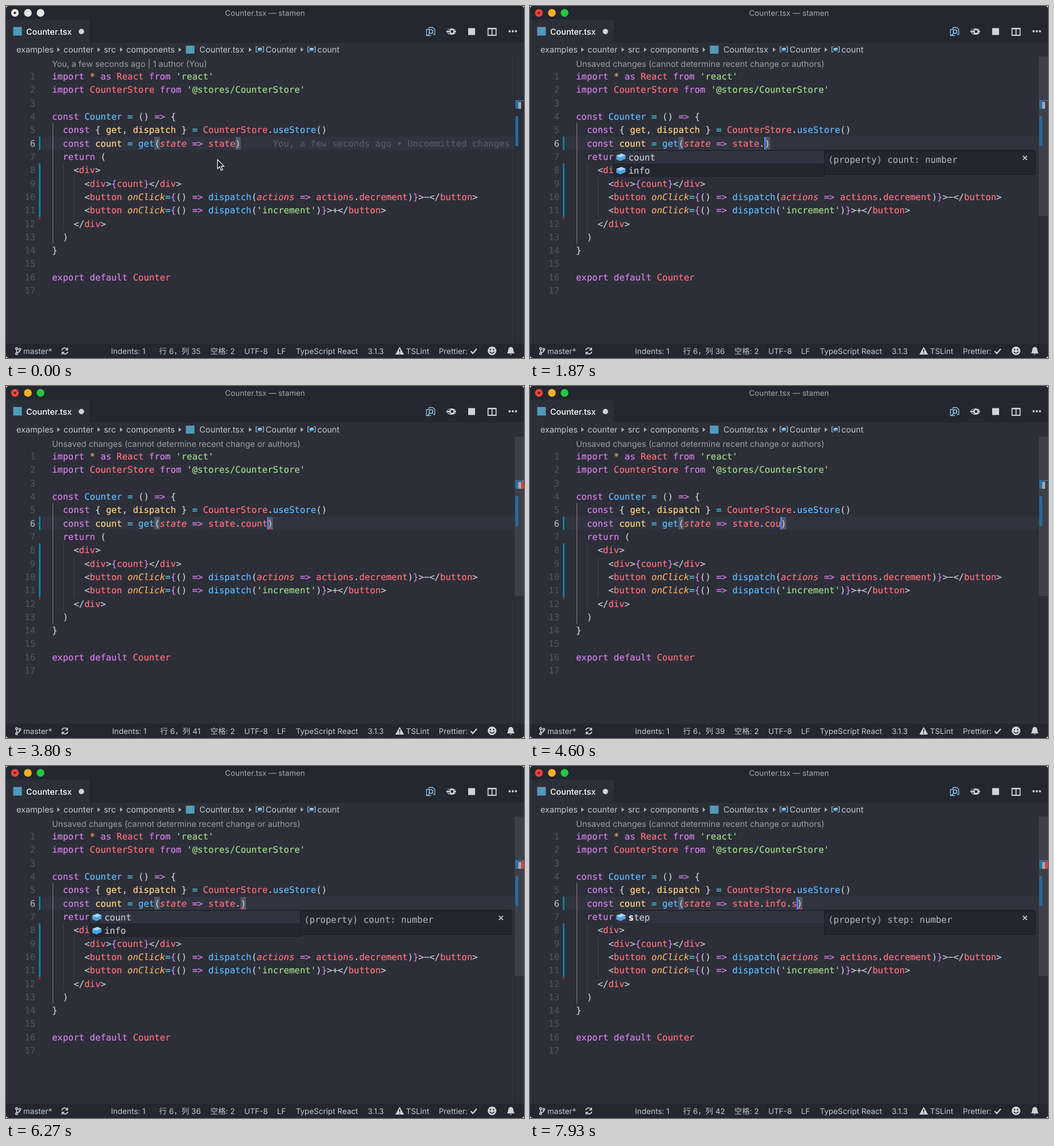
Recreate the animation shown at these times as an HTML page. Size 900 by 613 pixels, loop 8 s.

```html
<!DOCTYPE html>
<html lang="en">
<head>
<meta charset="utf-8">
<title>Counter.tsx</title>
<style>
html, body { margin: 0; width: 100%; height: 100%; overflow: hidden; background: #fff; }
svg { display: block; width: 900px; height: 613px; border-radius: 5px; }
text { white-space: pre; text-rendering: geometricPrecision; color: #c3c8d2; }
text, tspan { fill: currentColor; }
.ui { font-family: Inter, "Noto Sans CJK SC", "Noto Sans CJK", sans-serif; font-size: 14.4px; }
.small { font-size: 13.4px; }
.title { font-size: 13.3px; color: #a6a9b1; }
.tab { font-weight: 500; color: #fff; }
.code { font-family: "DejaVu Sans Mono", monospace; font-size: 15.55px; }
.code, .code text { stroke: currentColor; stroke-width: .22px; }
.code tspan { stroke: currentColor; }
.p { color: #d681e9; }
.r { color: #ff707b; }
.g { color: #9fdc86; }
.b { color: #60bbff; }
.y { color: #ffd580; }
.o { color: #eeac68; }
.c { color: #52c8de; }
.w { color: #c8cdd8; }
.ri { color: #ff707b; font-style: italic; }
.oi { color: #eeac68; font-style: italic; }
.hit { color: #fff; font-weight: bold; }
.num { color: #4f535e; text-anchor: end; }
.now { color: #aaaeb7; }
.dim { color: #575b66; }
.lens { color: #9da0a8; }
.doc { color: #a5a9b3; }
.line { fill: none; stroke: #d0d3d9; stroke-width: 1.6; }
.solid { fill: #d0d3d9; }
</style>
</head>
<body>
<svg viewBox="0 0 900 613">
  <defs>
    <g id="cube">
      <path d="M0 3.5 9 0l7 3v6l-9 4-7-3z" fill="#4aa3e0"/>
      <path d="M0 3.5 9 0l7 3-9 3.5z" fill="#a9d8f7"/>
    </g>
    <g id="field">
      <path d="M3 0H0v9h3M10 0h3v9h-3" fill="none" stroke="#b9bfca" stroke-width="1.2"/>
      <use href="#cube" transform="translate(2.5 1.5) scale(.5)"/>
    </g>
    <path id="chevron" d="M0 0l5 4-5 4z" fill="#a4a8b1"/>
  </defs>

  <rect width="900" height="613" fill="#2c2e38"/>
  <rect width="900" height="64" fill="#24272f"/>
  <rect y="24" width="146" height="40" fill="#2c2e38"/>
  <path d="M146.5 24v40" stroke="#1c1e25"/>
  <rect y="588" width="900" height="25" fill="#24272f"/>

  <g id="lights">
    <circle cx="15.5" cy="12" r="6.7"/>
    <circle cx="38" cy="12" r="6.7"/>
    <circle cx="60" cy="12" r="6.7"/>
    <circle cx="15.5" cy="12" r="2" fill="#51161a"/>
  </g>
  <text class="ui title" x="450" y="17" text-anchor="middle">Counter.tsx — stamen</text>

  <rect x="12.5" y="36.5" width="15" height="15" fill="#519aba"/>
  <text class="ui tab" x="35" y="50">Counter.tsx</text>
  <circle cx="131" cy="44.5" r="4.7" fill="#d0d2d7"/>

  <g class="line">
    <path d="M735 41v-3.500h6.500l3.500 3.500v8.500h-3M735 41h-4.500v10.500h8" stroke="#8fc3e6" stroke-width="1.3"/>
    <circle cx="738.5" cy="44.500" r="3.2" stroke="#8fc3e6"/>
    <path d="M736.300 47l-4 4.500" stroke="#8fc3e6"/>
    <circle cx="775" cy="44.5" r="3.6" stroke-width="2.4"/>
    <path d="M765 44.5h6M779 44.5h3" stroke-width="2.4"/>
    <path d="M767 42q7-5 14 0M767 47q7 5 14 0" stroke-width="1.1"/>
    <path d="M837.5 39h14v12h-14zM844.5 39v12M837 39.5h15" stroke-width="1.8"/>
  </g>
  <rect class="solid" x="803" y="38.5" width="12" height="12"/>
  <g class="solid"><circle cx="875" cy="44" r="1.9"/><circle cx="880.5" cy="44" r="1.9"/><circle cx="886" cy="44" r="1.9"/></g>

  <g id="crumbs">
    <rect x="312.5" y="69" width="15" height="14" fill="#519aba"/>
    <use href="#field" x="434.5" y="71"/>
    <use href="#field" x="524.5" y="71"/>
  </g>

  <rect x="62" y="227.3" width="822" height="23.3" fill="#31343e"/>
  <g fill="#515866">
    <rect x="257.8" y="228" width="9.4" height="22"/>
    <rect id="closer" y="228" width="9.4" height="22"/>
  </g>
  <path d="M81.5 204v210" stroke="#957f7d"/>
  <path d="M99.7 274v117M118.5 297.5v70" stroke="#41444f"/>
  <path d="M58.5 227.3v23.4M58.5 274v93.5" stroke="#12809f" stroke-width="3"/>
  <path d="M57 367.5l4 2.5-4 2.5z" fill="#b3262d"/>

  <text id="lens" class="ui lens" x="80" y="105.5"></text>
  <g id="editor" class="code"></g>
  <text id="blame" class="code dim" x="463.7" y="244.6">You, a few seconds ago • Uncommitted changes</text>
  <path id="squiggle" fill="none" stroke="#e5434d" stroke-width="1.3" d="M0 249l2-2 2.3 2 2.3-2 2.3 2"/>
  <rect id="caret" y="228" width="2.2" height="22" fill="#528bff"/>

  <path d="M884.5 88v500" stroke="#24262e"/>
  <rect id="slider" x="884" y="88" width="16" height="278" fill="#3d3f49"/>
  <rect x="885" y="192" width="5" height="52" fill="#276b9c"/>
  <path d="M885 164.7h15" stroke="#3a7fb8" stroke-width="1.5"/>
  <rect x="885" y="165" width="5" height="14" fill="#2573ab"/>
  <rect x="890" y="167" width="5" height="12" fill="#a4a6ab"/>
  <rect id="mark" x="895" y="166" width="5" height="13" fill="#cf414a"/>

  <g id="popup"></g>

  <g class="line" stroke-width="1.3">
    <circle cx="18.5" cy="596.5" r="1.7"/><circle cx="18.5" cy="605.5" r="1.7"/><circle cx="24" cy="598" r="1.7"/>
    <path d="M18.5 598v6M24 600q0 3-5 3.5"/>
    <path d="M97 599.5a5.2 5.2 0 0 1 9.5-1.5M107.5 602a5.2 5.2 0 0 1-9.5 1.5M107 595v4h-4M97.5 607v-4h4"/>
    <path d="M807.5 601l3.5 4 7-8" stroke-width="2.2"/>
  </g>
  <path class="solid" d="M684 593.5l7.5 13.5h-15z"/>
  <path d="M684 598v4.5M684 604v1.6" stroke="#24272f" stroke-width="1.7"/>
  <circle class="solid" cx="844.5" cy="600.5" r="7.5"/>
  <path d="M840.5 602q4 5 8 0" fill="none" stroke="#24272f" stroke-width="1.5"/>
  <circle cx="841.8" cy="598.5" r="1.2" fill="#24272f"/><circle cx="847.2" cy="598.5" r="1.2" fill="#24272f"/>
  <path class="solid" d="M870 605q2.5-2 2.5-6 0-4.5 4.5-5.5 4.5 1 4.5 5.5 0 4 2.5 6zM875 606h4q-2 2.500-4 0z"/>
  <g id="status"></g>

  <path id="mouse" d="M367.5 267.5v16l3.7-3.4 2.7 6.2 2.6-1.1-2.7-6h5z" fill="#15161a" stroke="#fff" stroke-width="1.2"/>
</svg>

<script>
const LOOP = 8000, BLINK = 500;
const LEFT = 80, CHAR = 9.361, ROW = 23.32, BASE = 128;
const $ = id => document.getElementById(id);
const escape = s => s.replace(/&/g, '&amp;').replace(/</g, '&lt;');
const text = (cls, x, y, body) => `<text class="${cls}" x="${x}" y="${y}">${body}</text>`;
const show = (id, on) => $(id).setAttribute('visibility', on ? 'visible' : 'hidden');

// Each line alternates a colour class with its text.
const spans = line => line.split('|').reduce((out, part, i, all) =>
  i % 2 ? out + `<tspan class="${all[i - 1]}">${escape(part)}</tspan>` : out, '');

const button = (handler, sign) =>
  `w|      <|r|button |oi|onClick|c|=|p|{|w|() |p|=> |b|dispatch|w|(|${handler}|w|)|p|}|w|>${sign}</|r|button|w|>`;

const lines = [
  "p|import |o|* |p|as |r|React |p|from |g|'react'",
  "p|import |r|CounterStore |p|from |g|'@stores/CounterStore'",
  '',
  'p|const |b|Counter |c|= |w|() |p|=> |w|{',
  'p|  const |w|{ |y|get|w|, |y|dispatch |w|} |c|= |r|CounterStore|w|.|b|useStore|w|()',
  '',
  'p|  return |w|(',
  'w|    <|r|div|w|>',
  'w|      <|r|div|w|>|p|{|r|count|p|}|w|</|r|div|w|>',
  button('ri|actions |p|=> |r|actions|w|.|r|decrement', '−'),
  button("g|'increment'", '+'),
  'w|    </|r|div|w|>',
  'w|  )',
  'w|}',
  '',
  'p|export default |r|Counter',
  ''
];
$('editor').innerHTML = lines.map((line, i) => {
  const y = BASE + i * ROW;
  return text(i === 5 ? 'num now' : 'num', 51, y, i + 1) +
    `<text id="line${i + 1}" x="${LEFT}" y="${y}">${spans(line)}</text>`;
}).join('');

const crumbs = [[18, 'examples'], [100, 'counter'], [170, 'src'], [209, 'components'],
  [336, 'Counter.tsx'], [451, 'Counter'], [541, 'count']];
$('crumbs').innerHTML += crumbs.map(([x, s]) => text('ui', x, 81, s)).join('') +
  [89, 159, 198, 300, 422, 512].map(x => `<use href="#chevron" x="${x}" y="72"/>`).join('');

const statusItems = [[30, 'master*'], [355, '空格: 2'], [414, 'UTF-8'], [471, 'LF'],
  [503.5, 'TypeScript React'], [628.5, '3.1.3'], [695, 'TSLint'], [752, 'Prettier:']];

function drawStatus(column) {
  const nudge = column % 10 === 1 ? 2 : 0;
  const items = [...statusItems, [182.5 + nudge, 'Indents: 1'], [266 + nudge, `行 6，列 ${column}`]];
  $('status').innerHTML = items.map(([x, s]) => text('ui small', x, 605.5, s)).join('');
}

const panel = (x, h) =>
  `<rect x="${x}" y="251.5" width="366" height="${h}" fill="#23262e" stroke="#191b21"/>`;

const types = {
  count: ['count: number'],
  info: ['info: {', 'step: number;', 'name: string;', '}'],
  name: ['name: string'],
  step: ['step: number']
};

function drawPopup({ items, pick, typed = 0 }) {
  if (!items) return '';
  const doc = types[items[pick]];
  const rows = items.map((item, i) =>
    `<use href="#cube" x="150" y="${257 + i * ROW}"/>` +
    text('code', 171, 268.7 + i * ROW,
      `<tspan class="hit">${item.slice(0, typed)}</tspan>${item.slice(typed)}`)).join('');
  return panel(145.5, items.length * 22.5) +
    `<rect x="146" y="${252 + pick * 22.5}" width="365" height="22" fill="#303440"/>` + rows +
    panel(511.5, doc.length > 1 ? 112 : 42) +
    doc.map((s, i) => text('code doc', 518, 273 + i * ROW, (i ? '' : '(property) ') + s)).join('') +
    '<path d="M856.5 261l7 7m0-7l-7 7" stroke="#b9bfca" stroke-width="1.8"/>';
}

const members = ['count', 'info'], nested = ['name', 'step'];
const steps = [
  [0, { tail: '', focus: false, mouse: true, error: false, edited: false, items: null, pick: 0 }],
  [330, { focus: true }],
  [600, { mouse: false }],
  [1600, { tail: '.', edited: true }],
  [1800, { items: members }],
  [2130, { error: true }],
  [2530, { pick: 1 }],
  [3070, { pick: 0 }],
  [3470, { tail: '.count', items: null }],
  [4070, { error: false }],
  ...['.coun', '.cou', '.co', '.c', '.', ''].map((tail, i) => [4470 + i * 90, { tail }]),
  [5290, { tail: '.' }],
  [5470, { items: members }],
  [5870, { error: true }],
  [6670, { pick: 1 }],
  [7000, { tail: '.info', items: null, pick: 0 }],
  [7400, { tail: '.info.' }],
  [7570, { items: nested }],
  [7850, { tail: '.info.s', items: ['step'], typed: 1 }]
];

let state = {};
const timeline = steps.map(([at, change]) => {
  const touched = 'tail' in change || 'focus' in change;
  state = { ...state, ...change, at, key: touched ? at : state.key };
  return state;
});

function drawState(s) {
  const column = 35 + s.tail.length;
  const end = LEFT + (column - 1) * CHAR;
  const tail = s.tail.replace(/\./g, '|w|.|r|');
  $('line6').innerHTML = spans(
    `p|  const |y|count |c|= |b|get|w|(|ri|state |p|=> |r|state${tail}|w|)`);
  $('closer').setAttribute('x', end);
  $('caret').setAttribute('x', end - 0.6);
  $('squiggle').setAttribute('transform', `translate(${end})`);
  $('lens').textContent = s.edited
    ? 'Unsaved changes (cannot determine recent change or authors)'
    : 'You, a few seconds ago | 1 author (You)';
  $('popup').innerHTML = drawPopup(s);
  show('blame', !s.edited);
  show('squiggle', s.error);
  show('mark', s.error);
  show('slider', s.focus);
  show('mouse', s.mouse);
  const colors = s.focus ? ['#fc4340', '#fdb022', '#24c840'] : Array(3).fill('#e4e5e7');
  colors.forEach((color, i) => $('lights').children[i].setAttribute('fill', color));
  drawStatus(column);
}

const start = performance.now();
let shown;
function tick() {
  const t = (performance.now() - start) % LOOP;
  const current = timeline.filter(s => s.at <= t).pop();
  if (current !== shown) drawState(shown = current);
  show('caret', current.focus && (t - current.key) % (2 * BLINK) < BLINK);
  requestAnimationFrame(tick);
}
tick();
</script>
</body>
</html>
```
